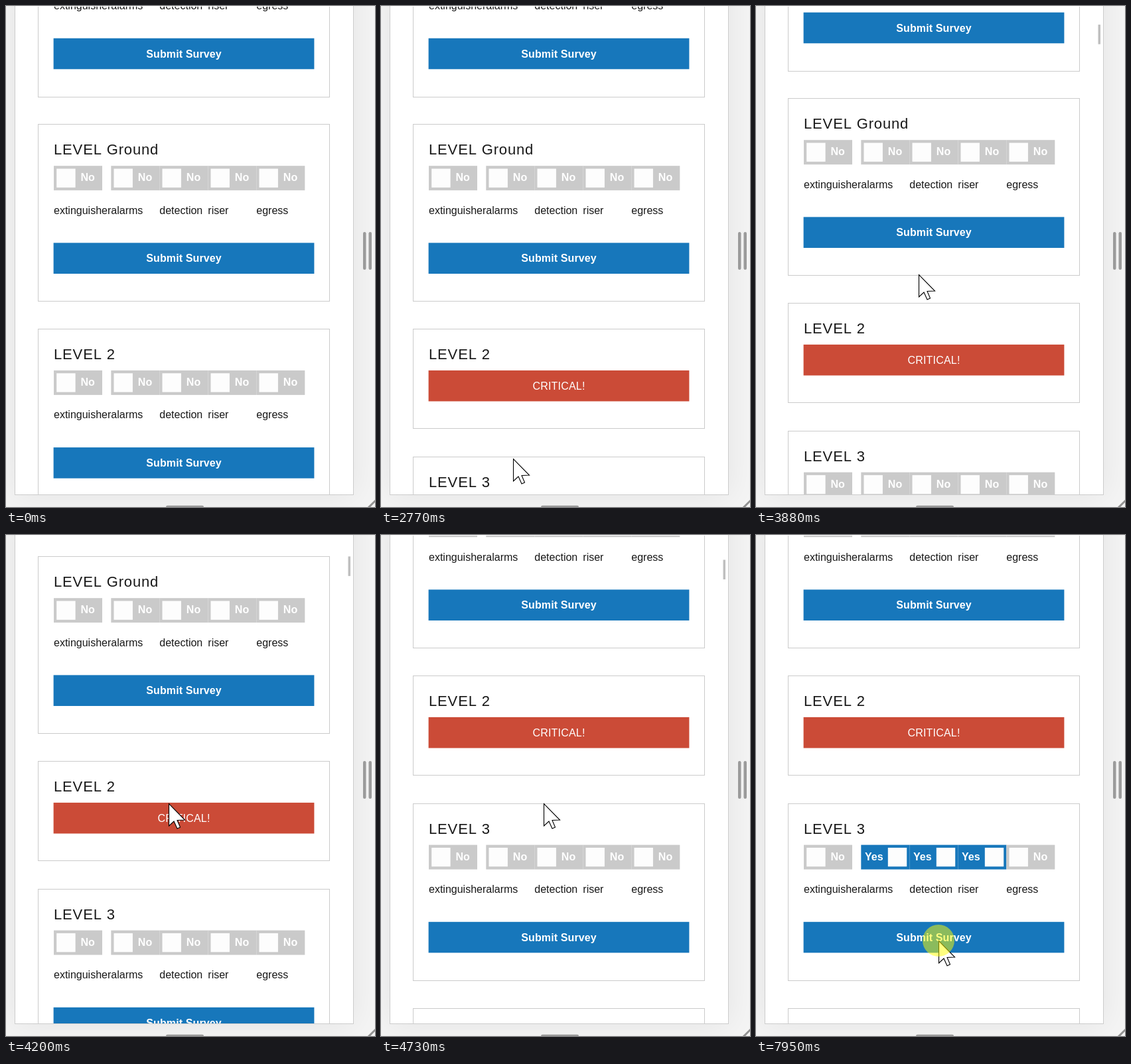
These frames come from a looping animation (556x756 px, 8 s). An HTML page with a canvas:

```html
<!DOCTYPE html>
<html lang="en">
<head>
<meta charset="utf-8">
<title>Survey</title>
<style>
  html, body { margin: 0; width: 100%; height: 100%; overflow: hidden; background: #f3f3f3; }
  canvas { display: block; width: 556px; height: 756px; }
</style>
</head>
<body>
<canvas id="stage" width="556" height="756"></canvas>
<script>
const ctx = document.getElementById('stage').getContext('2d');
const LOOP = 8000;
const FONT = '"Liberation Sans", Arial, sans-serif';
const BLUE = [23, 119, 187];
const GREY = [202, 202, 202];
const INK = '#181818';
const LABELS = ['extinguisher', 'alarms', 'detection', 'riser', 'egress'];

const ENTER = 170;
const TRAVEL = 470;
const PRESS = 75;
const START = { x: 239, y: 646 };

// Where the pointer goes: arrival time, optional click, optional toggle it flips
const STOPS = [
  { x: 100, y: 569, arrive: 650, click: 810, level: '2', toggle: 0 },
  { x: 202, y: 569, arrive: 1610, click: 1690, level: '2', toggle: 1 },
  { x: 199, y: 683, arrive: 2480, click: 2560 },
  { x: 245, y: 405, arrive: 3180, travel: 240 },
  { x: 190, y: 502, arrive: 5290, click: 5440, level: '3', toggle: 1 },
  { x: 261, y: 496, arrive: 6160, click: 6310, level: '3', toggle: 2 },
  { x: 320, y: 494, arrive: 6860, click: 7090, level: '3', toggle: 3 },
  { x: 275, y: 612, arrive: 7800, click: 7948 }
];
const COLLAPSE = STOPS[2].click + 205;

const clamp = v => Math.min(1, Math.max(0, v));
const smooth = p => p * p * (3 - 2 * p);
const progress = (t, start, length) => clamp((t - start) / length);
const lerp = (a, b, p) => a + (b - a) * p;
const blend = (a, b, p) => `rgb(${a.map((v, i) => Math.round(lerp(v, b[i], p)))})`;
const solid = c => blend(c, c, 0);
const scrollAt = t => 275 * smooth(progress(t, 3615, 1125));

function pointerAt(t) {
  return STOPS.reduce((from, { x, y, arrive, travel = TRAVEL }) => {
    const p = smooth(progress(t, arrive - travel, travel));
    return { x: lerp(from.x, x, p), y: lerp(from.y, y, p) };
  }, START);
}

function toggleState(level, index, t) {
  const stop = STOPS.find(s => s.level === level && s.toggle === index);
  return stop ? progress(t, stop.click + 20, 100) : 0;
}

function box(x, y, w, h, color) {
  ctx.fillStyle = color;
  ctx.fillRect(x, y, w, h);
}

function pill(x, y, w, h) {
  ctx.fillStyle = '#9b9b9b';
  ctx.beginPath();
  ctx.roundRect(x, y, w, h, Math.min(w, h) / 2);
  ctx.fill();
}

function text(str, x, y, { size = 16, weight = 400, color = '#fff', align = 'left', spacing = 0 } = {}) {
  ctx.font = `${weight} ${size}px ${FONT}`;
  ctx.letterSpacing = spacing + 'px';
  ctx.textAlign = align;
  ctx.fillStyle = color;
  ctx.fillText(str, x, Math.round(y));
}

function toggle(x, y, p) {
  box(x, y, 73, 37, blend(GREY, BLUE, p));
  text(p > 0 ? 'Yes' : 'No', x + (p > 0 ? 19.5 : 51.2), y + 23.2, { weight: 700, align: 'center' });
  box(x + 4.2 + 36.3 * p, y + 4.3, 28.4, 28.4, '#fdfdfd');
}

function bar(label, y, color, style) {
  box(71.6, y, 392.8, 46.6, color);
  text(label, 268, y + 29, { align: 'center', ...style });
}

// Draws one card and returns the top of the next
function card(level, top, t, critical = false) {
  const height = critical ? 151 : 268;
  ctx.strokeStyle = '#cbcbcb';
  ctx.lineWidth = 1;
  ctx.strokeRect(48.5, Math.round(top) + 0.5, 439, height - 1);
  text('LEVEL ' + level, 72, top + 45.9, { size: 22, color: INK, spacing: 0.85 });
  if (critical) {
    bar('CRITICAL!', top + 62.8, '#cb4b37', { spacing: 0.2 });
  } else {
    LABELS.forEach((label, i) => {
      const x = i ? 85.3 + 73 * i : 72;
      toggle(x, top + 62.8, toggleState(level, i, t));
      text(label, x, top + 135.2, { color: INK });
    });
    bar('Submit Survey', top + 179, solid(BLUE), { weight: 700, spacing: 0.12 });
  }
  return top + height + (critical ? 41.7 : 40.7);
}

function drawFrame() {
  box(0, 0, 556, 756, '#f4f4f4');
  ctx.save();
  ctx.shadowColor = 'rgba(0,0,0,0.07)';
  ctx.shadowBlur = 44;
  box(13, -40, 511, 778, '#cccccc');
  ctx.restore();
  box(14, 0, 509, 737, '#fff');

  pill(538, 341, 4.5, 57);
  pill(546.5, 341, 4.5, 57);
  pill(241, 753.8, 57, 4.5);
  ctx.strokeStyle = '#919191';
  ctx.lineWidth = 3;
  ctx.beginPath();
  ctx.moveTo(545, 758);
  ctx.lineTo(558, 745);
  ctx.stroke();
}

function drawPage(t) {
  const scroll = scrollAt(t);
  ctx.save();
  ctx.beginPath();
  ctx.rect(14, 1, 509, 736);
  ctx.clip();
  let top = -130.3 - Math.round(scroll);
  for (const level of ['1', 'Ground', '2', '3', '4']) {
    top = card(level, top, t, level === '2' && t >= COLLAPSE);
  }
  if (t >= 3480) {
    ctx.globalAlpha = 1 - progress(t, 4950, 250);
    box(515.5, 26.6 + scroll * 0.0395, 3.5, 29.5, '#bfbfbf');
  }
  ctx.restore();
}

function drawPointer(t) {
  if (t < ENTER) return;
  const { x, y } = pointerAt(t);
  const arrow = [[0, 0], [0, 33.5], [7.5, 26.5], [12.5, 37.5], [17, 35.5], [12.5, 25], [24, 24.5]];
  ctx.save();
  ctx.translate(Math.round(x) + 0.5, Math.round(y) + 0.5);
  ctx.beginPath();
  arrow.forEach(p => ctx.lineTo(...p));
  ctx.closePath();
  ctx.fillStyle = '#fff';
  ctx.fill();
  ctx.strokeStyle = '#000';
  ctx.lineWidth = 1.1;
  ctx.stroke();
  if (STOPS.some(({ click }) => t >= click && t < click + PRESS)) {
    ctx.beginPath();
    ctx.arc(-0.5, -0.5, 24, 0, Math.PI * 2);
    ctx.fillStyle = 'rgba(255,255,0,0.5)';
    ctx.fill();
  }
  ctx.restore();
}

const origin = performance.now();
function tick() {
  const t = Math.max(0, performance.now() - origin) % LOOP;
  drawFrame();
  drawPage(t);
  drawPointer(t);
  requestAnimationFrame(tick);
}
tick();
</script>
</body>
</html>
```
